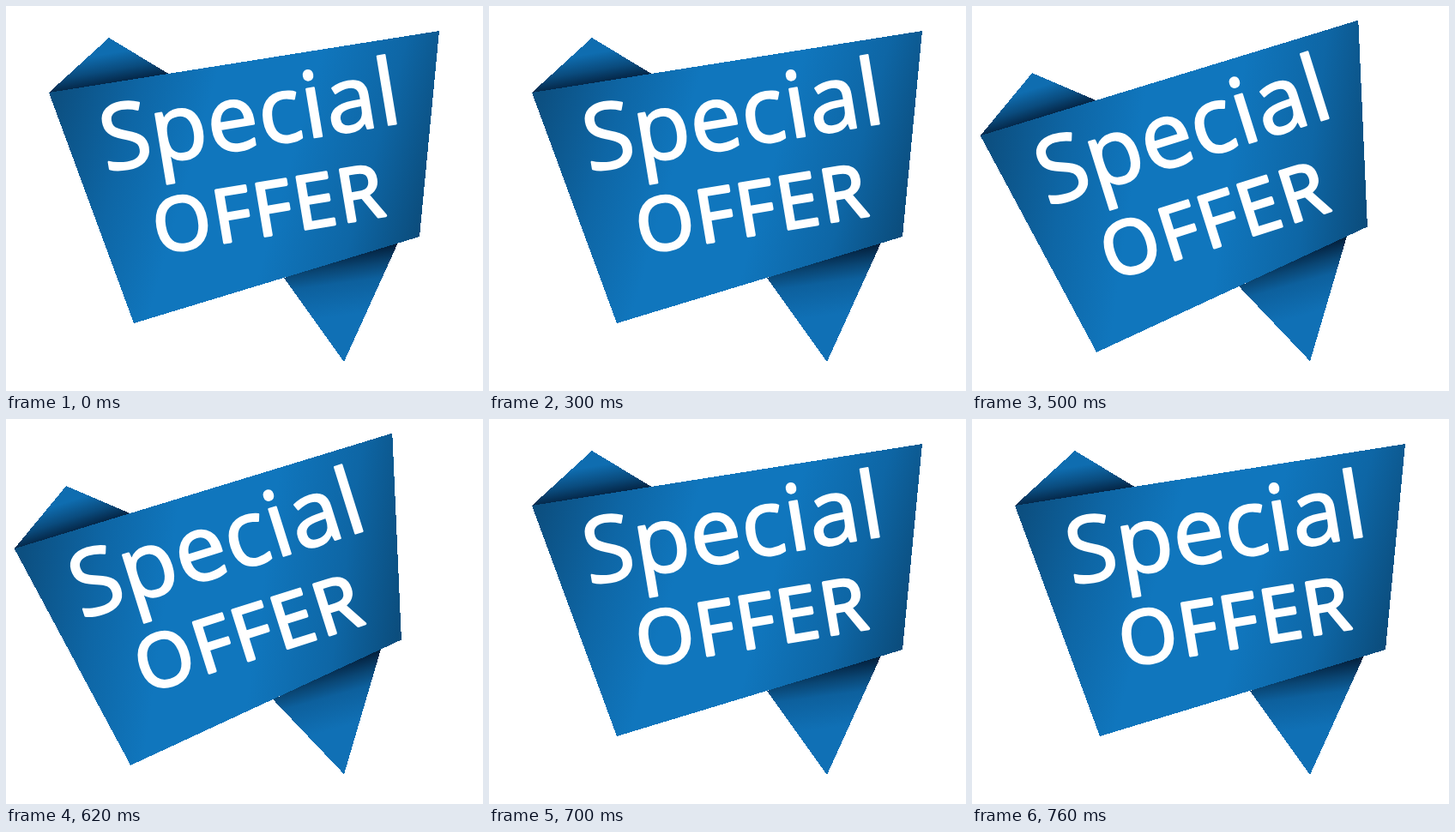
Animation, 556 px wide and 449 px high, one loop 800 ms. Source, as an HTML page:

```html
<!DOCTYPE html>
<html lang="en">
<head>
<meta charset="utf-8">
<title>Special offer</title>
<style>
  html, body { margin: 0; width: 100%; height: 100%; overflow: hidden; background: #fff; }
  svg { display: block; width: 100vw; height: 100vh; }
  polygon { shape-rendering: crispEdges; }
  text { font-family: "Open Sans", "Noto Sans", sans-serif; fill: #fff; stroke: #fff; stroke-linejoin: round; }
</style>
</head>
<body>
<svg viewBox="0 0 556 449">
  <defs>
    <linearGradient id="face" gradientUnits="userSpaceOnUse" x1="60" y1="100" x2="500" y2="225">
      <stop offset="0" stop-color="#0c4f80"/>
      <stop offset=".2" stop-color="#0e66a5"/>
      <stop offset=".38" stop-color="#1076bd"/>
      <stop offset=".62" stop-color="#1076bd"/>
      <stop offset=".82" stop-color="#0e66a5"/>
      <stop offset="1" stop-color="#0b4a78"/>
    </linearGradient>
    <linearGradient id="topFold" gradientUnits="userSpaceOnUse" x1="123" y1="91" x2="117" y2="56">
      <stop offset="0" stop-color="#042444"/>
      <stop offset=".45" stop-color="#0a4b7d"/>
      <stop offset="1" stop-color="#0f6db0"/>
    </linearGradient>
    <linearGradient id="tail" gradientUnits="userSpaceOnUse" x1="420" y1="281" x2="430" y2="356">
      <stop offset="0" stop-color="#031c37"/>
      <stop offset=".28" stop-color="#0a4674"/>
      <stop offset=".5" stop-color="#0d609d"/>
      <stop offset="1" stop-color="#1070b5"/>
    </linearGradient>
  </defs>
  <g id="banner">
    <polygon points="50,101 120,37 191,80 180,90" fill="url(#topFold)"/>
    <polygon points="324,317 457,276 394,415" fill="url(#tail)"/>
    <polygon points="50,101 505,29 482,269 149,370" fill="url(#face)"/>
    <text transform="translate(116 193.5) rotate(-9.4)" font-size="107" letter-spacing=".6" stroke-width="2.2">Special</text>
    <text transform="translate(177 289) rotate(-9.5)" font-size="86" letter-spacing="3.5" stroke-width="3.5">OFFER</text>
  </g>
</svg>
<script>
  const LOOP = 800, TILT_START = 500, TILT_END = 700;
  const banner = document.getElementById("banner");

  // The banner snaps between two poses, pivoting near the tip of its tail.
  function draw(time) {
    const t = time % LOOP;
    const angle = t >= TILT_START && t < TILT_END ? -8 : 0;
    banner.setAttribute("transform", `rotate(${angle} 389 414)`);
  }

  const start = performance.now();
  function tick() {
    draw(performance.now() - start);
    requestAnimationFrame(tick);
  }
  tick();
</script>
</body>
</html>
```
